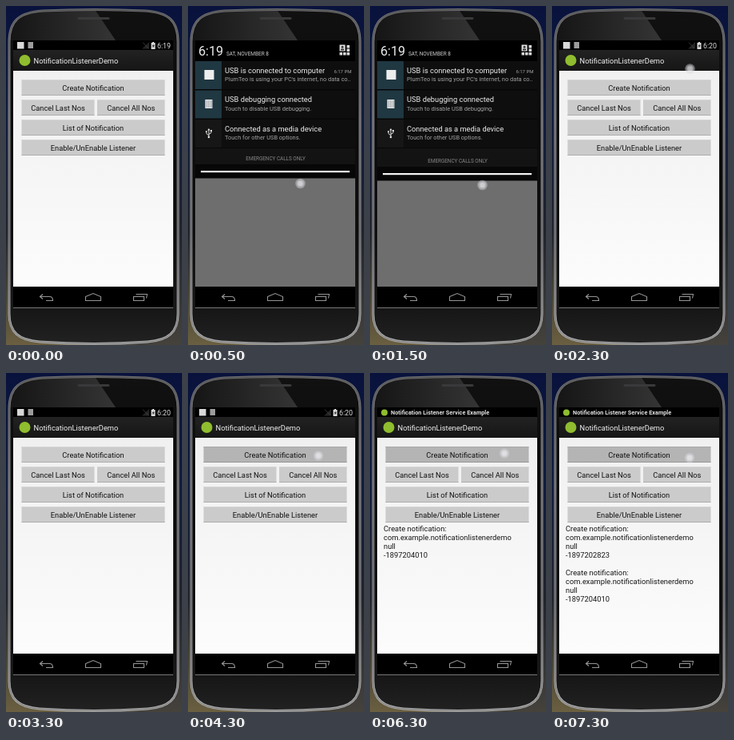
These frames come from a looping animation (220 by 424 pixels, 8 s). An HTML page with a canvas:

```html
<!DOCTYPE html>
<html lang="en">
<head>
<meta charset="utf-8">
<title>Notification listener demo</title>
<style>
html, body { margin: 0; width: 100%; height: 100%; overflow: hidden; background: #111; }
canvas { display: block; width: 220px; height: 424px; }
</style>
</head>
<body>
<canvas id="stage" width="220" height="424"></canvas>
<script>
const LOOP = 8000;
const ctx = document.getElementById('stage').getContext('2d');

// Each scene holds until the next one begins.
const scenes = [
  { at: 0, clock: '6:19' },
  { at: 500, shade: 0, cursor: [140.5, 222] },
  { at: 1500, shade: 3, cursor: [140.5, 224] },
  { at: 2300, clock: '6:20', cursor: [172.5, 78.5] },
  { at: 3300, clock: '6:20' },
  { at: 4300, clock: '6:20', pressed: true, cursor: [163, 103.5] },
  { at: 6300, pressed: true, cursor: [168, 100.5], log: ['-1897204010'] },
  { at: 7300, pressed: true, cursor: [172, 106], log: ['-1897202823', '-1897204010'] }
];

function rect(x, y, w, h, color) {
  ctx.fillStyle = color;
  ctx.fillRect(x, y, w, h);
}

function disc(x, y, r, color) {
  ctx.fillStyle = color;
  ctx.beginPath();
  ctx.arc(x, y, r, 0, 7);
  ctx.fill();
}

function text(str, x, y, size, color, align = 'left', weight = 400) {
  ctx.font = `${weight} ${size}px Roboto, sans-serif`;
  ctx.textAlign = align;
  ctx.fillStyle = color;
  ctx.fillText(str, x, y);
}

function stroke(path, color, width = 1) {
  ctx.strokeStyle = color;
  ctx.lineWidth = width;
  ctx.stroke(new Path2D(path));
}

function fill(path, color) {
  ctx.fillStyle = color;
  ctx.fill(new Path2D(path));
}

function gradient(y0, y1, ...colors) {
  const g = ctx.createLinearGradient(0, y0, 0, y1);
  colors.forEach((c, i) => g.addColorStop(i / (colors.length - 1), c));
  return g;
}

function phone() {
  rect(0, 0, 110, 424, gradient(0, 424, '#08123c', '#101c40', '#20242c', '#6a5f40'));
  rect(110, 0, 110, 424, gradient(0, 424, '#08123c', '#101c40', '#20242c', '#45423c'));

  const body = 'M4 385 V45 C4 18 17 8 46 6 Q110 3 174 6 C203 8 215 18 215 45 V385'
    + ' C215 408 203 418 177 420 Q110 425 42 420 C16 418 4 408 4 385 Z';
  fill(body, gradient(0, 424, '#111', '#0b0b0b', '#0f0f0f', '#1c1c1c'));

  ctx.save();
  ctx.clip(new Path2D(body));
  const gloss = ctx.createLinearGradient(5, 0, 135, 0);
  gloss.addColorStop(0, '#151515');
  gloss.addColorStop(1, '#343434');
  fill('M0 0 H108 L137 43 H0 Z', gloss);
  rect(0, 378, 220, 46, gradient(378, 424, '#161616', '#222'));
  ctx.restore();

  stroke(body, gradient(0, 424, '#6c6c6e', '#8a8a8c', '#85858a', '#b0b0b0'), 3);
  stroke(body, 'rgba(20,20,20,0.35)', 1);
  ctx.lineCap = 'round';
  stroke('M91 15.5 H128', '#39393b', 3);
  ctx.lineCap = 'butt';
  rect(9, 377, 200, 1, '#777');
}

function navBar() {
  rect(9, 351, 200, 26, '#000');
  const c = '#939393';
  stroke('M46 360.5 L42.5 363.5 L46 366.5 M43 363.5 H54.5 Q58.5 363.5 58.5 368.5 H50', c, 1.2);
  stroke('M99.5 363.5 L109 359.5 L118.5 363.5 V368.5 H99.5 Z', c, 1.1);
  stroke('M159.5 363.5 H172.5 V368.5 H159.5 Z M162.5 360.5 H176.5 L175.5 365.5', c, 1.1);
}

function statusBar(scene) {
  rect(9, 43, 200, 12, '#000');
  if (scene.log) {
    disc(18, 49.5, 4, '#8fbd2f');
    text('Notification Listener Service Example', 26, 52, 7.3, '#e2e2e2', 'left', 700);
    return;
  }
  rect(14, 45, 8.5, 8.5, '#d8d8d8');
  rect(27.5, 45, 6.5, 8, '#9c9c9c');
  fill('M170 53.5 L179 45 V53.5 Z', '#242424');
  stroke('M171 45.5 L178 53', '#444', 0.8);
  rect(181.5, 46, 5, 8, '#dedede');
  rect(183, 45, 2, 1, '#dedede');
  fill('M184.7 47 L182.5 50.4 H184 L183.3 53 L185.8 49.3 H184.2 Z', '#222');
  text(scene.clock, 206, 52.5, 8.8, '#e0e0e0', 'right');
}

function button(label, x, y, w, pressed) {
  rect(x, y, w, 20, pressed ? '#b4b4b4' : '#cbcbcb');
  rect(x, y, w, 1, pressed ? '#a8a8a8' : '#d6d6d6');
  rect(x, y + 19, w, 1, pressed ? '#989898' : '#adadad');
  text(label, x + w / 2, y + 13.5, 9.3, '#111', 'center');
}

function app(scene) {
  statusBar(scene);
  rect(9, 55, 200, 26, gradient(55, 81, '#222', '#161616'));
  disc(23.5, 68, 7, '#8fbd2f');
  text('NotificationListenerDemo', 34.5, 72, 9.3, '#f2f2f2');
  rect(9, 81, 200, 270, gradient(81, 351, '#f0f0f0', '#fcfcfc'));
  button('Create Notification', 19.5, 92, 179, scene.pressed);
  button('Cancel Last Nos', 19.5, 117, 91, false);
  button('Cancel All Nos', 114, 117, 84.5, false);
  button('List of Notification', 19.5, 142, 179, false);
  button('Enable/UnEnable Listener', 19.5, 167, 179, false);
  (scene.log || []).forEach((id, entry) => {
    const lines = ['Create notification:', 'com.example.notificationlistenerdemo', 'null', id];
    lines.forEach((line, i) => text(line, 17, 198 + 55 * entry + 11 * i, 9.35, '#161616'));
  });
}

function row(y, title, detail, iconColor) {
  rect(9, y, 200, 35, '#0e0e0e');
  rect(9, y, 33, 35, iconColor);
  text(title, 46, y + 14.5, 9.3, '#ededed');
  text(detail, 46, y + 25.3, 7.4, '#a2a2a2');
}

function shade(offset) {
  rect(9, 43, 200, 308, '#6e6e6e');
  rect(9, 43, 200, 172.5 + offset, '#070707');
  rect(9, 178, 200, 20 + offset, '#131313');
  rect(9, 43, 200, 26, '#000');
  text('6:19', 13, 62, 16.2, '#ededed');
  text('SAT, NOVEMBER 8', 48, 62, 6.45, '#d0d0d0');

  rect(189.5, 48.5, 7, 8, '#e2e2e2');
  disc(193, 51.3, 1.5, '#333');
  rect(191, 53.5, 4, 2, '#333');
  for (const [x, y] of [[198.5, 49], [198.5, 53.5], [189.5, 58], [194, 58], [198.5, 58]]) {
    rect(x, y, 3.5, 3.5, '#dcdcdc');
  }

  row(69, 'USB is connected to computer', "PlumTeo is using your PC's internet, no data co..", '#203842');
  text('6:17 PM', 204.5, 84, 6, '#a2a2a2', 'right');
  rect(20.5, 80, 12, 12, '#ededed');

  row(105.5, 'USB debugging connected', 'Touch to disable USB debugging.', '#203842');
  rect(21.5, 117, 9, 11, '#e6e6e6');
  for (let x = 23.5; x < 30; x += 2) rect(x, 118, 0.5, 9, '#5c6a70');

  row(142, 'Connected as a media device', 'Touch for other USB options.', '#161616');
  stroke('M26 154 V164 M26 162 L23 159.5 V157 M26 160.5 L29 158.5 V156', '#ddd', 1);
  fill('M24.3 155.5 L26 153 L27.7 155.5 Z', '#ddd');
  disc(26, 164, 1.3, '#ddd');
  disc(23, 157, 1, '#ddd');
  rect(28, 155, 2, 2, '#ddd');

  text('EMERGENCY CALLS ONLY', 109.5, 192.5 + offset, 6.35, '#8a8a8a', 'center');
  rect(16, 206 + offset, 186, 2.2, '#f4f4f4');
}

function cursor([x, y]) {
  disc(x, y, 6.3, 'rgba(215,215,222,0.42)');
  disc(x, y, 4.8, 'rgba(235,235,242,0.3)');
  disc(x, y, 3.2, 'rgba(255,255,255,0.35)');
}

function draw(now) {
  const t = now % LOOP;
  const scene = scenes.findLast(s => s.at <= t);
  phone();
  if (scene.shade === undefined) app(scene);
  else shade(scene.shade);
  navBar();
  if (scene.cursor) cursor(scene.cursor);
  requestAnimationFrame(draw);
}

draw(0);
</script>
</body>
</html>
```
